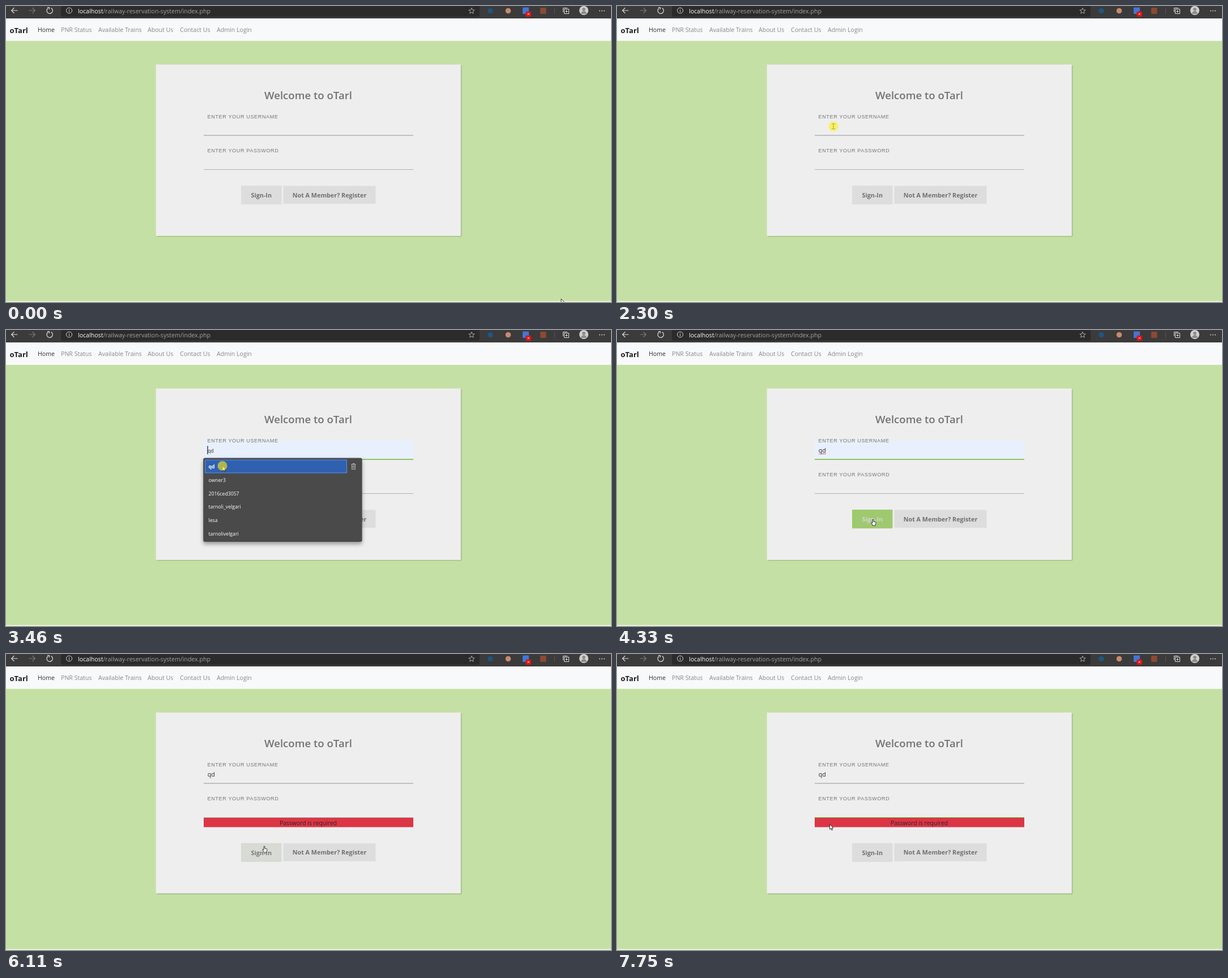
Write an HTML page with a canvas that moves like this. It is 1068 px wide and 524 px high and loops after 8 s.

```html
<!DOCTYPE html>
<html lang="en">
<head>
<meta charset="utf-8">
<title>Sign in</title>
<style>
  html, body { margin: 0; width: 100%; height: 100%; overflow: hidden; background: #c5e0a4; }
  canvas { display: block; width: 100vw; height: 100vh; }
</style>
</head>
<body>
<canvas id="stage" width="1068" height="524"></canvas>
<script>
const ctx = document.getElementById('stage').getContext('2d');
const LOOP = 8000;
const SANS = '"Open Sans", "Noto Sans", sans-serif';
const ARIAL = '"Liberation Sans", Arial, sans-serif';
const BRAND = 'oTarl';
const USER = 'qd';
const USERS = [USER, 'owner3', '2016ced3057', 'tarnoli_velgari', 'lesa', 'tarnolivelgari'];

const OPEN = 2390, PREVIEW = 3000, PICK = 3540, RELOAD = 5100;

// Pointer moves: start, time of last step, steps, target x, target y
const MOVES = [
  [70, 70, 1, 939, 475],
  [1290, 1290, 1, 936.5, 475],
  [1380, 1460, 2, 514, 236],
  [1670, 2070, 6, 382, 213],
  [2700, 3080, 5, 382, 235],
  [3160, 3230, 2, 382, 240.5],
  [4000, 4330, 5, 452, 335],
  [6110, 6110, 1, 456, 340],
  [6190, 6590, 6, 394.5, 267],
  [7350, 7750, 6, 375.5, 301.5]
];
const CLICKS = [[2300, 2480], [3390, 3620], [4930, 5100], [6810, 6970]];
const CARETS = [[2390, 2920, 356], [3390, 3540, 356], [3540, 4000, 370], [4630, 4930, 370]];

const within = (t, a, b) => t >= a && t < b;
const easeOut = (t, start, span) => {
  const x = Math.min(1, Math.max(0, (t - start) / span));
  return 1 - (1 - x) * (1 - x);
};
const mix = (a, b, p) => `rgb(${a.map((v, i) => Math.round(v + (b[i] - v) * p))})`;

function rect(x, y, w, h, fill, r = 0) {
  ctx.fillStyle = fill;
  ctx.beginPath();
  ctx.roundRect(x, y, w, h, r);
  ctx.fill();
}

function disc(x, y, r, fill) {
  ctx.fillStyle = fill;
  ctx.beginPath();
  ctx.arc(x, y, r, 0, Math.PI * 2);
  ctx.fill();
}

function text(str, x, y, size, fill, { weight = 400, family = SANS, align = 'left', gap = 0 } = {}) {
  ctx.font = `${weight} ${size}px ${family}`;
  ctx.letterSpacing = gap + 'px';
  ctx.textAlign = align;
  ctx.fillStyle = fill;
  ctx.fillText(str, x, y);
}

function stroke(d, color, width = 1, x = 0, y = 0) {
  ctx.save();
  ctx.translate(x, y);
  ctx.strokeStyle = color;
  ctx.lineWidth = width;
  ctx.stroke(new Path2D(d));
  ctx.restore();
}

function shadow(color, blur, dx, dy, draw) {
  ctx.save();
  ctx.shadowColor = color;
  ctx.shadowBlur = blur;
  ctx.shadowOffsetX = dx;
  ctx.shadowOffsetY = dy;
  draw();
  ctx.restore();
}

function toolbar(t) {
  rect(0, 0, 1068, 22, '#3b3b3b');
  rect(97, -6, 739, 25, '#2b2b2b', 3);
  stroke('M20.5 8H10M14.5 3.2L9.7 8L14.5 12.8', '#e4e4e4', 1.2);
  stroke('M40.5 8H51M46.5 3.2L51.3 8L46.5 12.8', '#7b7b7b', 1.2);
  if (within(t, 5010, 5190)) stroke('M72.5 3.5L81.5 12.5M81.5 3.5L72.5 12.5', '#e4e4e4', 1.2);
  else stroke('M74 4A5.2 5.2 0 1 0 79.5 3.5M73 2.7H76.3V6', '#e4e4e4', 1.2);
  stroke('M106.5 8a5 5 0 1 0 10 0a5 5 0 1 0-10 0M111.5 7.2V11M111.5 5V6.2', '#d6d6d6');

  text('localhost', 127, 12.7, 10.6, '#ffffff');
  const hostWidth = ctx.measureText('localhost').width;
  text('/railway-reservation-system/index.php', 127 + hostWidth, 12.7, 10.6, '#a3a3a3');

  let star = '';
  for (let i = 0; i < 10; i++) {
    const r = i % 2 ? 2.4 : 5.4, a = i * Math.PI / 5 - Math.PI / 2;
    star += `${i ? 'L' : 'M'}${r * Math.cos(a)} ${r * Math.sin(a)}`;
  }
  stroke(star + 'Z', '#b9b9b9', 0.9, 822, 8.8);

  disc(855, 8.5, 4.6, '#1d5688');
  disc(886.5, 8.5, 4.8, '#c78a70');
  rect(912, 2.5, 11, 11.5, '#3f78d8', 1);
  rect(917.5, 9.5, 9.5, 9.5, '#e01313', 2);
  stroke('M920.8 12.8L923.7 15.7M923.7 12.8L920.8 15.7', '#fff', 0.9);
  rect(943, 3, 10.5, 11, '#8b4a31', 1);
  rect(968, 3, 1, 11, '#575757');

  stroke('M985.5 5.5H993.5V13.5H985.5ZM983.5 11V3.5H991M989.5 7.3V11.7M987.3 9.5H991.7', '#dedede');
  disc(1020, 8, 8, '#d2d0ce');
  disc(1020, 5.8, 2.9, '#8c8a88');
  ctx.fillStyle = '#8c8a88';
  ctx.beginPath();
  ctx.arc(1020, 14, 5, Math.PI, 0);
  ctx.fill();
  for (let i = 0; i < 3; i++) disc(1048 + i * 4, 8.5, 0.9, '#e0e0e0');
}

function navbar() {
  rect(0, 22, 1068, 39.7, '#f8f9fa');
  text(BRAND, 6.5, 47.8, 13, '#1c1c1c', { weight: 700 });
  text('Home', 56, 46.2, 10.6, '#2e2e2e');
  const links = [['PNR Status', 97], ['Available Trains', 163], ['About Us', 250], ['Contact Us', 307], ['Admin Login', 372]];
  for (const [label, x] of links) text(label, x, 46.2, 10.6, '#868788');
}

function button(label, x, y, w, h, hover = 0) {
  rect(x, y, w, h, mix([221, 221, 221], [139, 195, 74], hover), 1);
  text(label, x + w / 2, y + h / 2 + 4.2, 10.8, mix([112, 112, 112], [245, 245, 245], hover), { weight: 700, align: 'center' });
}

function hoverAt(t) {
  if (t < RELOAD) return easeOut(t, 4170, 320);
  return easeOut(Math.min(t, 6190), 6100, 320) * (1 - easeOut(t, 6190, 320));
}

function underline(y, h, focus) {
  rect(349, y, 370, h, mix([176, 176, 176], [112, 182, 54], focus));
}

function form(t) {
  const failed = t >= RELOAD;
  const drop = failed ? 16.8 : 0;
  shadow('rgba(0,0,0,.22)', 2, 1, 1, () => rect(264.6, 103.6, 538.2, 303.4 + drop, '#eeeeee'));
  text('Welcome to ' + BRAND, 456, 165, 18.6, '#737373', { weight: 600 });

  const filled = t >= PREVIEW && !failed;
  if (filled) rect(349, 196, 370, 33, '#e8f0fe');
  const label = { family: ARIAL, gap: 0.6 };
  text('ENTER YOUR USERNAME', 355.5, 199.2, 9.1, '#777777', label);
  text('ENTER YOUR PASSWORD', 355.5, 259.2, 9.1, '#777777', label);
  underline(228.3, 1.5, failed ? 0 : easeOut(t, 2420, 300));

  if (within(t, PREVIEW, PICK)) text(USER, 356, 216.9, 8.7, '#2b2b2b');
  else if (t >= PICK) text(USER, 355.7, 217.3, 10.7, '#262626');
  if (within(t, 4000, RELOAD)) {
    let wave = 'M356 219.5';
    for (let x = 357; x <= 369; x++) wave += `L${x} ${x % 2 ? 218.7 : 220}`;
    stroke(wave, '#d8434e', 0.8);
  }
  for (const [a, b, x] of CARETS) if (within(t, a, b)) rect(x - 0.6, 205.3, 1.2, 14.7, '#111');

  if (failed) {
    rect(349, 290, 370, 16.5, '#dc3545');
    text('Password is required', 533.5, 302.6, 10.4, '#2c2328', { align: 'center' });
    if (within(t, 6970, 7490)) rect(355.4, 265.3, 1.2, 14.7, '#111');
  }
  underline(289.1, 1, easeOut(t, 6970, 300));
  button('Sign-In', 415, 318 + drop, 71.5, 33.3, hoverAt(t));
  button('Not A Member? Register', 489.5, 318.5 + drop, 163, 31.8);
}

function suggestions(t) {
  if (!within(t, OPEN, PICK)) return;
  shadow('rgba(0,0,0,.36)', 7, 0, 4, () => rect(348.2, 226.5, 280.4, 148.4, '#4a4a4a', 3));
  const active = t >= PREVIEW;
  if (active) {
    rect(351, 229.6, 251, 23.8, '#3061b0', 1);
    stroke('M351.5 230.1H601.5V252.9H351.5Z', '#5f8fdd');
    stroke('M609.5 238H617.5M612 238V236.5H615V238M610.5 238V246.5H616.5V238M612.5 240V244.5M614.5 240V244.5', '#c4c4c4', 0.9);
  }
  USERS.forEach((name, i) => {
    text(name, 357.5, 244.9 + i * 23.8, 8.7, '#ffffff', { weight: active && !i ? 700 : 500 });
  });
}

function pointerAt(t) {
  let x = 980, y = 518.5;
  for (const [start, end, steps, tx, ty] of MOVES) {
    if (t < start) break;
    const pace = steps > 1 ? (end - start) / (steps - 1) : 1;
    const f = Math.min(1, (Math.floor((t - start) / pace + 1e-6) + 1) / steps);
    const e = f * f * (3 - 2 * f);
    x += (tx - x) * e;
    y += (ty - y) * e;
  }
  return [x, y];
}

function pointerShape(t, x, y) {
  const top = t >= RELOAD ? 334.8 : 318;
  if (within(x, 415, 486) && within(y, top, top + 33)) return 'hand';
  if (within(x, 349, 719) && (within(y, 198, 226) || within(y, 270, 289))) return 'beam';
  return 'arrow';
}

function drawPointer(shape, x, y) {
  if (shape === 'beam') {
    stroke('M-3-4.5H-.8L0-4L.8-4.5H3M0-4V4M-3 4.5H-.8L0 4L.8 4.5H3', '#3c3c3c', 1.1, x, y);
    return;
  }
  const d = shape === 'arrow'
    ? 'M0 0V9L2.1 7.1L3.6 10.5L5 9.9L3.5 6.6H6.4Z'
    : 'M-.9.8Q0-.5.9.8V4.2L4 4.9Q5.2 5.3 5 6.6L4.2 9.5V11.2H-.9V10L-3.3 6.8Q-3.5 5.5-2.2 5.8L-.9 7Z';
  ctx.save();
  ctx.translate(x, y);
  ctx.fillStyle = '#fff';
  ctx.fill(new Path2D(d));
  ctx.restore();
  stroke(d, '#222', 0.9, x, y);
}

function pointer(t) {
  const [x, y] = pointerAt(t);
  drawPointer(pointerShape(t, x, y), x, y);
  if (CLICKS.some(([a, b]) => within(t, a, b))) disc(x, y, 8.5, 'rgba(255,240,20,.6)');
}

function draw(t) {
  rect(0, 0, 1068, 524, '#c5e0a4');
  toolbar(t);
  navbar();
  form(t);
  suggestions(t);
  rect(0, 522.6, 1068, 1.4, '#f6f8f2');
  pointer(t);
}

const began = performance.now();
function tick() {
  draw((performance.now() - began) % LOOP);
  requestAnimationFrame(tick);
}
tick();
</script>
</body>
</html>
```
